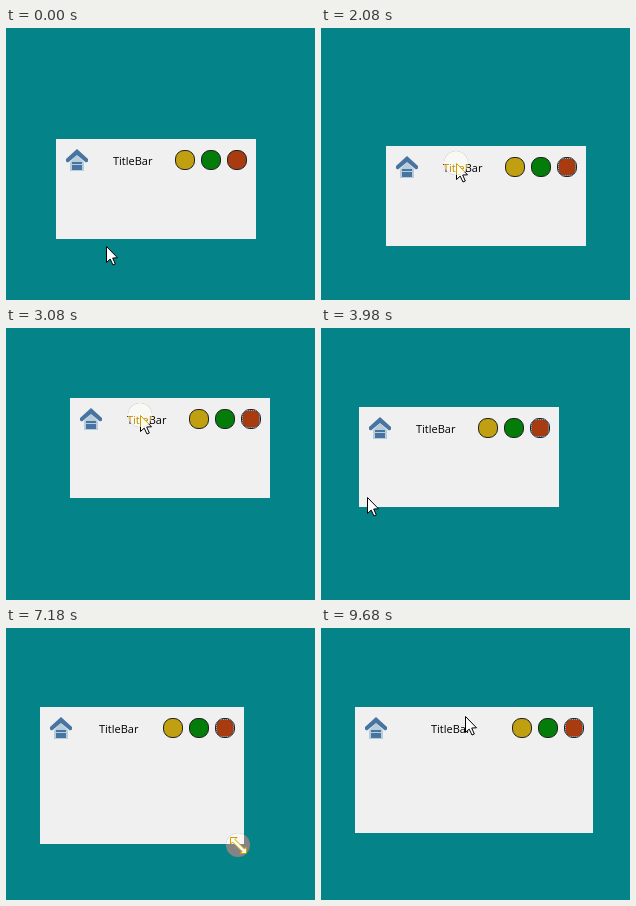
An HTML page with a canvas for the animation above (9.78 s loop, 309 by 272 pixels).

```html
<!DOCTYPE html>
<html lang="en">
<head>
<meta charset="utf-8">
<title>TitleBar</title>
<style>
html, body { margin: 0; width: 100%; height: 100%; overflow: hidden; background: #048488; }
canvas { display: block; width: 100vw; height: 100vh; }
</style>
</head>
<body>
<canvas id="stage" width="309" height="272"></canvas>
<script>
const ctx = document.getElementById('stage').getContext('2d', { alpha: false });
const LOOP = 9780, STEP = 100, FIRST = 780;

const normal = { desk: '#048488', panel: '#f0f0f0', text: '#000', fill: '#fff', edge: '#000' };
const lit = { desk: '#848484', panel: '#f8f8f5', text: '#c08800', fill: '#fffff0', edge: '#d09c00' };

// What a held pointer does to the window
const grips = {
  title(win, x, y) {
    const width = win.right - win.left, height = win.bottom - win.top;
    win.left = x - 70;
    win.top = y - 17;
    win.right = win.left + width;
    win.bottom = win.top + height;
  },
  leftCorner(win, x, y) { win.left = x - 6; win.bottom = y + 8; },
  rightCorner(win, x, y) { win.right = x + 6; win.bottom = y - 1; },
  bottomEdge(win, x, y) { win.bottom = y; }
};

// Pointer strokes, each a smooth curve through points evenly spaced in time
const strokes = [
  { from: 680, to: 1680, path: [[100, 218], [120, 128]] },
  { from: 1780, to: 3280, grip: 'title',
    path: [[120, 128], [135, 135], [132, 92], [108, 140], [142, 89], [108, 96]] },
  { from: 3280, to: 4180, path: [[108, 96], [66, 138], [49, 165], [44, 171]] },
  { from: 4480, to: 5380, grip: 'leftCorner', path: [[44, 171], [30, 239], [38, 215], [40, 206]] },
  { from: 5380, to: 6880, path: [[40, 206], [130, 213], [220, 214], [232, 215]] },
  { from: 7080, to: 7680, grip: 'rightCorner', path: [[232, 215], [235, 223], [260, 250], [266, 225]] },
  { from: 7680, to: 8580, path: [[266, 225], [222, 210], [180, 219], [174, 224]] },
  { from: 8880, to: 9280, grip: 'bottomEdge', path: [[174, 224], [174, 205]] },
  { from: 9280, to: 9680, path: [[174, 205], [144, 88]] }
];

const shapes = {
  arrow: [0, 0, 0, 16, 3.7, 12.6, 6.5, 18.5, 8.8, 17.5, 6.2, 11.5, 11, 11.3],
  ns: [0, -11, 4, -7, 1.5, -7, 1.5, 7, 4, 7, 0, 11, -4, 7, -1.5, 7, -1.5, -7, -4, -7],
  nwse: [-8, -8, -1.5, -8, -3.5, -6, 6, 3.5, 8, 1.5, 8, 8, 1.5, 8, 3.5, 6, -6, -3.5, -8, -1.5]
};
shapes.nesw = shapes.nwse.map((v, i) => i % 2 ? v : -v);

// Catmull-Rom curve, k from 0 to 1
function along(path, k) {
  const last = path.length - 1;
  const i = Math.min(Math.floor(k * last), last - 1), u = k * last - i;
  const point = n => path[Math.max(0, Math.min(last, n))];
  return [0, 1].map(axis => {
    const [a, b, c, d] = [-1, 0, 1, 2].map(n => point(i + n)[axis]);
    return Math.round(b + u / 2 * (c - a + u * (2 * a - 5 * b + 4 * c - d + u * (3 * (b - c) + d - a))));
  });
}

function stateAt(t) {
  const state = {
    win: { left: 50, top: 111, right: 250, bottom: 211 },
    pointer: strokes[0].path[0], held: null, focused: t >= strokes[1].from
  };
  for (const { from, to, path, grip } of strokes) {
    if (t < from) break;
    state.pointer = along(path, Math.min(1, (t - from) / (to - from)));
    if (grip) grips[grip](state.win, ...state.pointer);
    state.held = t < to && grip;
  }
  return state;
}

// The pointer turns into a resize arrow along the lower edge
function pointerKind({ left, right, bottom }, [x, y]) {
  if (y < bottom - 8 || y > bottom + 2) return 'arrow';
  return x < left + 12 ? 'nesw' : x > right - 12 ? 'nwse' : 'ns';
}

function polygon(points) {
  ctx.beginPath();
  for (let i = 0; i < points.length; i += 2) ctx.lineTo(points[i], points[i + 1]);
  ctx.closePath();
}

function rect(color, x, y, w, h) {
  ctx.fillStyle = color;
  ctx.fillRect(x, y, w, h);
}

function house(x, y) {
  ctx.save();
  ctx.translate(x, y);
  ctx.fillStyle = '#b8cddc';
  polygon([4, 12, 11, 5, 18, 12, 18, 21, 4, 21]);
  ctx.fill();
  rect('#4874a2', 6, 12, 10, 2);
  rect('#4874a2', 6, 15, 10, 5);
  polygon([11, -1, 22, 9, 22, 11.5, 20, 12.5, 11, 5, 2, 12.5, 0, 11.5, 0, 9]);
  ctx.fill();
  ctx.restore();
}

function roundSquare(x, y, half, radius) {
  ctx.beginPath();
  ctx.roundRect(x - half, y - half, half * 2, half * 2, radius);
}

function button(x, y, color, focused) {
  ctx.save();
  roundSquare(x, y, 9.5, 8.5);
  ctx.fillStyle = color;
  ctx.fill();
  ctx.strokeStyle = '#202020';
  ctx.stroke();
  if (focused) {
    roundSquare(x, y, 8.5, 5);
    ctx.setLineDash([1, 1]);
    ctx.lineDashOffset = .5;
    ctx.strokeStyle = '#57bfef';
    ctx.stroke();
  }
  ctx.restore();
}

function scene(colors, { win, pointer, held, focused }) {
  const width = win.right - win.left;
  // The buttons trail slightly while the left edge is pulled
  const lag = held === 'leftCorner' ? 2 : 0;
  rect(colors.desk, 0, 0, 309, 272);
  rect(colors.panel, win.left, win.top, width, win.bottom - win.top);
  house(win.left + 10, win.top + 11);
  ctx.fillStyle = colors.text;
  ctx.font = '11px "Open Sans", "Noto Sans", sans-serif';
  ctx.fillText('TitleBar', win.left + Math.round(57 + (width - 200) / 2), win.top + 26);
  ['#c0a010', '#047c0a', '#a83c10'].forEach((color, i) =>
    button(win.right - 71 + i * 26 + lag, win.top + 21, color, focused && i === 2));

  ctx.save();
  ctx.translate(pointer[0] + .5, pointer[1] + .5);
  polygon(shapes[pointerKind(win, pointer)]);
  ctx.fillStyle = colors.fill;
  ctx.fill();
  ctx.strokeStyle = colors.edge;
  ctx.stroke();
  ctx.restore();
}

function draw(now) {
  const time = now % LOOP;
  const t = time < FIRST ? 0 : FIRST + Math.floor((time - FIRST) / STEP) * STEP;
  const state = stateAt(t);
  scene(normal, state);
  if (state.held) {
    ctx.save();
    ctx.beginPath();
    ctx.arc(...state.pointer, 12, 0, Math.PI * 2);
    ctx.clip();
    scene(lit, state);
    ctx.restore();
  }
}

const start = performance.now();
function tick() {
  draw(performance.now() - start);
  requestAnimationFrame(tick);
}
tick();
</script>
</body>
</html>
```
